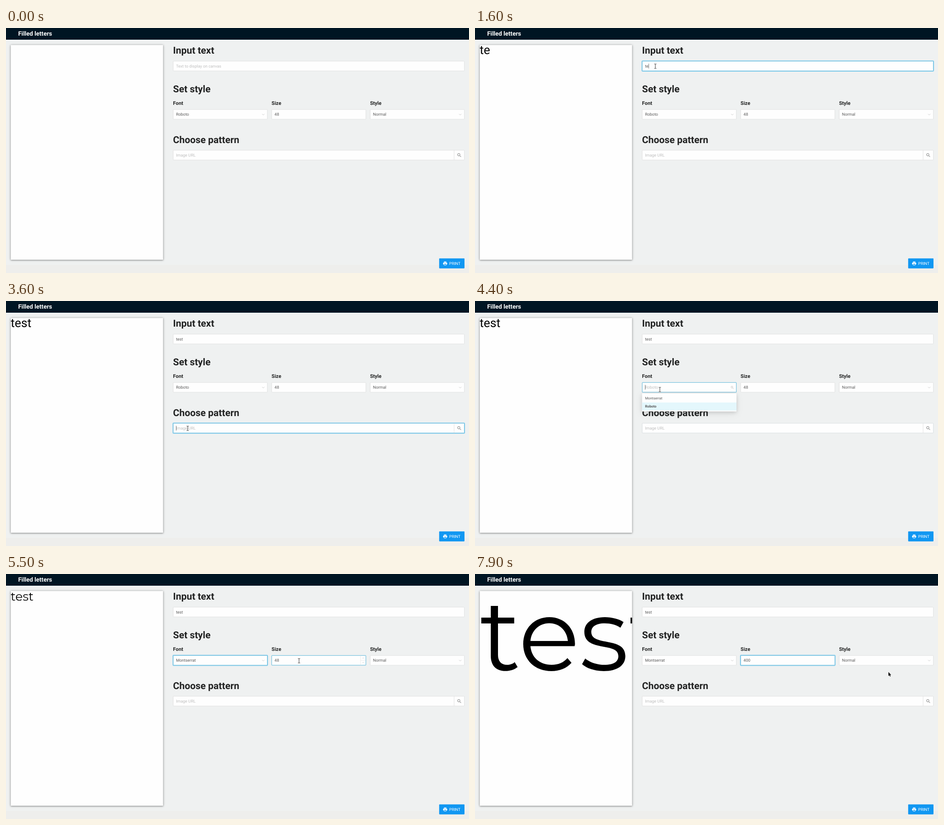
Write an HTML page that moves like this. It is 1027 px wide and 545 px high and loops after 8000 ms.

```html
<!DOCTYPE html>
<html lang="en">
<head>
<meta charset="utf-8">
<title>Filled letters</title>
<style>
html, body { margin: 0; width: 100%; height: 100%; overflow: hidden; background: #eeeeec; }
svg { display: block; width: 100vw; height: 100vh; }
text { font: 8.96px Roboto, sans-serif; fill: #595959; text-rendering: geometricPrecision; white-space: pre; }
.title { font-size: 13.45px; font-weight: 700; fill: #fff; }
.h1 { font-size: 21.3px; font-weight: 700; fill: #222323; }
.h4 { font-size: 11.2px; font-weight: 700; fill: #222323; }
.opt { font-size: 7.85px; }
.hint { fill: #bfbfbf; }
.paper { filter: drop-shadow(0 1.6px 1.4px rgba(0,0,0,.36)) drop-shadow(0 .5px 2.5px rgba(0,0,0,.24)); }
.menu { filter: drop-shadow(0 2px 4px rgba(0,0,0,.14)) drop-shadow(0 4px 8px rgba(0,0,0,.07)); }
.line { fill: none; stroke: #bdbdbd; stroke-width: .8; }
</style>
</head>
<body>
<svg id="stage" viewBox="0 0 1027 545" preserveAspectRatio="none"></svg>
<script>
const NS = 'http://www.w3.org/2000/svg';
const LOOP = 8000;
const stage = document.getElementById('stage');

function add(tag, attrs = {}, parent = stage) {
  const el = document.createElementNS(NS, tag);
  for (const k in attrs) el.setAttribute(k, attrs[k]);
  parent.appendChild(el);
  return el;
}
function label(x, y, str, cls = '', parent = stage) {
  const el = add('text', { x, y, class: cls }, parent);
  el.textContent = str;
  return el;
}
function rect(x, y, width, height, fill, parent = stage, rx = 0) {
  return add('rect', { x, y, width, height, fill, rx }, parent);
}
function show(el, alpha) { el.setAttribute('opacity', Number(alpha)); }
function ramp(t, start, length = 200) {
  const k = Math.min(1, Math.max(0, (t - start + 100) / length));
  return 1 - (1 - k) * (1 - k);
}
// Fades in at start, out again at end
function span(t, start, end, fadeOut = 200) {
  return ramp(t, start) * (1 - ramp(t, end, fadeOut));
}
const within = (t, a, b) => t >= a && t < b;

function field(x, y, w) {
  const h = 22.4, box = { x, y, w, h };
  const frame = (grow, fill, stroke, width) => add('rect', {
    x: x - grow, y: y - grow, width: w + 2 * grow, height: h + 2 * grow,
    rx: 1.1 + grow, fill, stroke, 'stroke-width': width
  });
  box.glow = frame(.45, 'none', '#4cbdf0', 1.5);
  frame(-.35, '#fefefe', '#d7d8d8', .7);
  box.edge = frame(-.35, 'none', '#3eb0de', .8);
  box.set = (edge, glow) => { show(box.edge, edge); show(box.glow, glow * .6); };
  box.set(0, 0);
  return box;
}
function chevron(x, y, size = 2.6, dir = 1) {
  return add('path', { class: 'line', d: `M${x - size} ${y - dir * size / 2}l${size} ${dir * size}l${size} ${-dir * size}` });
}
function magnifier(x, y, scale, fill) {
  return add('path', {
    fill, transform: `translate(${x} ${y}) scale(${scale}) translate(-12 -12)`,
    d: 'M15.5 14h-.79l-.28-.27A6.47 6.47 0 0 0 16 9.5 6.5 6.5 0 1 0 9.5 16c1.61 0 3.09-.59 4.23-1.57l.27.28v.79l5 4.99L20.49 19zm-6 0a4.5 4.5 0 1 1 0-9 4.5 4.5 0 0 1 0 9z'
  });
}

// Page
rect(0, 0, 1027, 527, '#eff1f1');
rect(0, 0, 1027, 26, '#001523');
label(27, 17.2, 'Filled letters', 'title');
rect(10.5, 37.8, 338, 477.8, '#fefefe').setAttribute('class', 'paper');
label(370.6, 57, 'Input text', 'h1');
label(370.6, 143.3, 'Set style', 'h1');
label(370.6, 255.5, 'Choose pattern', 'h1');
[[370.6, 'Font'], [589, 'Size'], [807.4, 'Style']].forEach(([x, s]) => label(x, 171.4, s, 'h4'));

// Fields
const input = field(370.6, 73.4, 646.4);
const font = field(370.6, 180.9, 209.4);
const size = field(589, 180.9, 209.6);
field(807.6, 180.9, 209.4);
const pattern = field(370.6, 271.6, 646.4);
add('path', { d: 'M994 272V293.6', stroke: '#d7d8d8', 'stroke-width': .7 });

const inputText = label(377.2, 87.9, '');
const fontText = label(377.2, 194.9, '');
const selection = rect(595.6, 187, 10.2, 10.6, '#1890ff');
const sizeText = label(595.6, 195.3, '');
label(814, 194.9, 'Normal');
label(377.2, 286, 'Image URL', 'hint');
const fontArrow = chevron(570.6, 192.4);
const fontSearch = magnifier(570.8, 192.5, .36, '#bdbdbd');
chevron(1007.4, 192.4);
magnifier(1005.6, 283, .48, '#858686');

const steppers = add('g');
[add('path', { d: 'M786.3 181.5V202.8M786.3 192.2H798', stroke: '#dfe0e0', 'stroke-width': .6 }),
 chevron(792.2, 187, 1.5, -1), chevron(792.2, 196.9, 1.5)].forEach(el => steppers.appendChild(el));

// Print button
rect(960.8, 512.4, 56.2, 22.3, '#1197f2', stage, 1.1);
add('path', {
  fill: '#fff', transform: 'translate(968.7 518.2) scale(.45)',
  d: 'M19 8H5c-1.66 0-3 1.34-3 3v6h4v4h12v-4h4v-6c0-1.66-1.34-3-3-3zm-3 11H8v-5h8v5zm3-7a1 1 0 1 1 0-2 1 1 0 0 1 0 2zM18 3H6v4h12z'
});
label(983, 526.7, 'PRINT').style.fill = '#fff';

// Preview
add('rect', { x: 10.5, y: 37.8, width: 338, height: 477.8 }, add('clipPath', { id: 'sheet' }));
const sheet = add('g', { 'clip-path': 'url(#sheet)' });
const plain = label(10.5, 57.6, '', '', sheet);
plain.style.cssText = 'font-size:26.9px;fill:#000';
const wide = add('g', {}, sheet);
const tee = 'M14 97H35V71H51V97H87V110H51V180C51 194 58 202 71 202C77 202 84 200 88 196L94.5 207C87 213 77.5 215.8 67.5 215.8C46.7 215.8 35 203.5 35 182V110H14Z';
const ee = 'M221 160.5H123C125 185 143 202 170 202C184.5 202 196.5 197 205 187L214 197.5C203.5 209.5 188 216 169.5 216C132.8 216 107 191 107 156C107 121 131.5 96 164.8 96C198 96 221.8 120.5 221.8 156ZM123 149H206C204 126 187.5 109.5 164.8 109.5C142 109.5 125 126 123 149Z';
const ess = 'M285.5 216C265.5 216 247 209.5 237.5 200.5L244.5 188C253.5 195.5 269 202 286.5 202C309 202 318 194.5 318 182.5C318 150.5 242.5 175 242.5 128.5C242.5 109.5 259 96 288 96C303 96 320 100 329.5 107L322.5 119.5C312.5 112.5 300 109.7 288 109.7C267 109.7 258 117.7 258 129C258 162 333.5 138 333.5 182.5C333.5 203 316 216 285.5 216Z';
[[tee, 0], [ee, 0], [ess, 0], [tee, 331]].forEach(([d, dx]) =>
  add('path', { d, transform: `translate(${dx})`, 'fill-rule': 'evenodd' }, wide));

// Font menu
const menu = add('g');
rect(370.6, 205.6, 209.4, 40.2, '#fefefe', menu, 1.1).setAttribute('class', 'menu');
const hoverRow = rect(370.6, 207.8, 209.4, 17.9, '#f4f5f5', menu);
rect(370.6, 225.7, 209.4, 17.9, '#e4f7fc', menu);
label(377.2, 219.4, 'Montserrat', 'opt', menu);
label(377.2, 237.2, 'Roboto', 'opt', menu).style.fontWeight = 700;

const caret = rect(0, 0, .8, 10.6, '#555');

// Pointer
const pointer = add('g');
const arrow = add('path', {
  d: 'M0 0V9L2.1 7.2L3.6 10.3L5 9.6L3.6 6.7L6.2 6.4Z',
  fill: '#111', stroke: '#fff', 'stroke-width': .7, 'paint-order': 'stroke'
}, pointer);
const beam = add('g', {}, pointer);
[['#fff', 2.2], ['#333', 1]].forEach(([stroke, w]) => add('path', {
  d: 'M-2.4 -5H-.8L0 -4.4L.8 -5H2.4M0 -4.4V4.4M-2.4 5H-.8L0 4.4L.8 5H2.4',
  fill: 'none', stroke, 'stroke-width': w
}, beam));

const track = [
  [200, 340, 50], [400, 376, 70], [500, 390, 78], [700, 400, 82], [800, 400, 85],
  [2600, 400, 85], [2700, 399, 112], [2800, 398, 155], [2900, 398, 190],
  [3000, 399, 232], [3100, 400, 253], [3200, 400, 253], [3300, 401, 274],
  [3500, 403, 283], [3900, 403, 284], [4000, 403, 284], [4100, 407, 238],
  [4200, 410, 197], [4500, 410, 197], [4700, 410, 218], [5100, 410, 218],
  [5200, 450, 212], [5300, 530, 202], [5500, 650, 193], [5600, 650, 193],
  [5700, 602, 194], [5800, 545, 194], [5900, 536, 194], [7500, 536, 194],
  [7600, 660, 172], [7700, 860, 145], [7800, 984, 134], [7900, 917, 218]
];
function pointerAt(t) {
  const i = track.findIndex(p => p[0] >= t);
  const b = track[i < 0 ? track.length - 1 : i];
  const a = track[Math.max(0, i - 1)];
  if (i < 1 || b[0] === t) return [b[1], b[2]];
  const k = (t - a[0]) / (b[0] - a[0]);
  return [a[1] + (b[1] - a[1]) * k, a[2] + (b[2] - a[2]) * k];
}
function isBeam(x, y) {
  const inside = [input, font, size, pattern].some(f =>
    x > f.x && x < f.x + f.w && y > f.y && y < f.y + f.h);
  return inside || (x > 371 && x < 520 && y > 235 && y < 262);
}

function placeCaret(t) {
  const typed = inputText.getComputedTextLength();
  const spots = [
    [600, 1200, 377.2, 79.4], [1500, 2400, 377.2 + typed, 79.4], [3000, 3500, 377.2 + typed, 79.4],
    [3500, 4100, 377.2, 277.6], [4200, 4800, 377.2, 186.6],
    [5600, 5700, 605.6, 186.9], [6800, 7600, 595.6 + sizeText.getComputedTextLength(), 186.9]
  ];
  const spot = spots.find(s => within(t, s[0], s[1]));
  show(caret, !!spot);
  if (spot) {
    caret.setAttribute('x', spot[2]);
    caret.setAttribute('y', spot[3]);
  }
}

function draw(ms) {
  const t = Math.floor(ms / 100) * 100;
  const typed = 'test'.slice(0, Math.max(0, t / 100 - 14));
  const thin = t >= 5100;
  const open = within(t, 4200, 5100);
  const digits = t < 6800 ? '48' : '400'.slice(0, t / 100 - 67);

  inputText.textContent = typed || 'Text to display on canvas';
  inputText.setAttribute('class', typed ? '' : 'hint');
  fontText.textContent = thin ? 'Montserrat' : 'Roboto';
  fontText.setAttribute('class', open ? 'hint' : '');
  sizeText.textContent = digits;
  const selected = within(t, 5700, 6800);
  show(selection, selected);
  sizeText.style.fill = selected ? '#fff' : '';

  plain.textContent = thin ? '' : typed;
  show(wide, thin);
  wide.setAttribute('transform', `translate(10.5 38) scale(${digits / 400}) translate(-10.5 -38)`);

  input.set(span(t, 500, 3500), span(t, 800, 3500));
  pattern.set(span(t, 3300, 4200, 400), span(t, 3500, 4100));
  font.set(t < 7600 ? ramp(t, 4200) : 0, span(t, 4500, 5600));
  size.set(ramp(t, 5400), ramp(t, 5600));
  show(steppers, span(t, 5400, 5800, 300));

  show(menu, span(t, 4200, 5100));
  show(hoverRow, ramp(t, 4600));
  show(fontArrow, !open);
  show(fontSearch, open);
  placeCaret(t);

  const [x, y] = pointerAt(t);
  const text = isBeam(x, y);
  show(pointer, t >= 200);
  show(beam, text);
  show(arrow, !text);
  pointer.setAttribute('transform', `translate(${x} ${y})`);
}

const start = performance.now();
function tick() {
  draw((performance.now() - start) % LOOP);
  requestAnimationFrame(tick);
}
tick();
</script>
</body>
</html>
```
